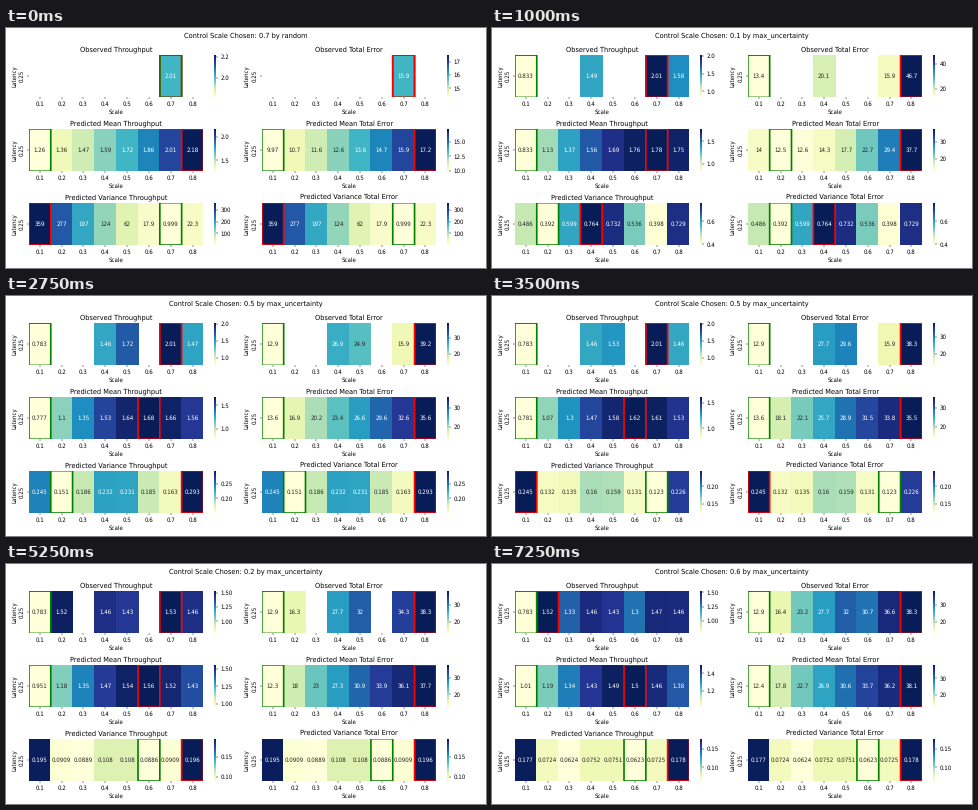
A matplotlib script for the animation above (7.5 s loop, 480 by 240 pixels).

```python
import numpy as np
import matplotlib.pyplot as plt
from matplotlib.animation import FuncAnimation
from matplotlib.patches import Rectangle

plt.rcParams.update({"font.family": "DejaVu Sans", "text.hinting": "none",
                     "path.snap": False})

STEPS, INTERVAL = 30, 250
SCALES = np.arange(1, 9) / 10
LATENCY = .25
PRIOR_VARIANCE = 1000
MAX_TRIES = 4
NA = np.nan

# Per scale: first reading, and the running average after MAX_TRIES readings.
THROUGHPUT = ([.934, 1.49, 1.33, 1.49, 1.72, 1.3, 2.014, 1.58],
              [.783, 1.52, 1.33, 1.46, 1.43, 1.3, 1.47, 1.46])
ERROR = ([14.3, 15.7, 23.2, 20.1, 24.9, 30.7, 15.915, 46.7],
         [12.9, 16.4, 23.2, 27.7, 32, 30.7, 36.6, 38.3])

# Quadratic features of (latency, scale), one row per scale.
ONE = np.ones_like(SCALES)
FEATURES = np.column_stack([ONE, LATENCY * ONE, SCALES, LATENCY ** 2 * ONE,
                            LATENCY * SCALES, SCALES ** 2])


def averages(readings, counts):
    """Running averages: all readings after the first are alike."""
    first, settled = map(np.array, readings)
    tries = np.maximum(counts, 1)
    share = (1 - 1 / tries) / (1 - 1 / MAX_TRIES)
    return np.where(counts > 0, first + (settled - first) * share, NA)


def simulate():
    """Bayesian quadratic fit that always tries the least certain scale."""
    counts = np.zeros(8, int)
    column, states = 6, []
    for _ in range(STEPS):
        counts[column] += 1
        precision = (np.eye(6) / PRIOR_VARIANCE
                     + FEATURES.T @ (counts[:, None] * FEATURES))
        cov = np.linalg.inv(precision)
        variance = np.sum(FEATURES @ cov * FEATURES, axis=1)
        seen = [averages(data, counts) for data in (THROUGHPUT, ERROR)]
        fits = [FEATURES @ cov @ FEATURES.T @ (counts * np.nan_to_num(avg))
                for avg in seen]
        states.append((column, [*seen, *fits, variance, variance]))
        column = np.argmax(np.where(counts < MAX_TRIES, variance, -1))
    return states


def luminance(rgb):
    rgb = np.asarray(rgb[:3])
    lin = np.where(rgb <= .03928, rgb / 12.92, ((rgb + .055) / 1.055) ** 2.4)
    return lin @ [.2126, .7152, .0722]


class Heatmap:
    def __init__(self, ax, title, edge_order):
        self.mesh = ax.pcolormesh(np.zeros((1, 8)), cmap="YlGnBu")
        ax.set(xlim=(0, 8), ylim=(1, 0), title=title,
               xlabel="Scale", ylabel="Latency")
        ax.set_xticks(np.arange(8) + .5, [f"{s:.1f}" for s in SCALES])
        ax.set_yticks([.5], [str(LATENCY)], rotation=90, va="center")
        ax.spines[:].set_visible(False)
        bar = ax.figure.colorbar(self.mesh, ax=ax)
        bar.outline.set_linewidth(0)
        self.notes = [ax.text(c + .5, .5, "", ha="center", va="center")
                      for c in range(8)]
        self.boxes = {}
        for color in edge_order:
            box = Rectangle((0, 0), 1, 1, fill=False, edgecolor=color, lw=3)
            self.boxes[color] = ax.add_patch(box)

    def show(self, row):
        low, high = np.nanmin(row), np.nanmax(row)
        if low == high:
            low, high = low * .9, high * 1.1
        self.mesh.set_array(np.ma.masked_invalid(row[None, :]))
        self.mesh.set_clim(low, high)
        for note, value in zip(self.notes, row):
            if np.isnan(value):
                note.set_text("")
                continue
            fill = self.mesh.cmap(self.mesh.norm(value))
            note.set_text(f"{value:.3g}")
            note.set_color(".15" if luminance(fill) > .408 else "w")
        self.boxes["green"].set_x(np.nanargmin(row))
        self.boxes["red"].set_x(np.nanargmax(row))


fig, axes = plt.subplots(3, 2, figsize=(12, 6), dpi=40)
heading = fig.suptitle("", y=.983)
maps = []
for axes_row, kind in zip(axes, ("Observed", "Predicted Mean",
                                 "Predicted Variance")):
    left, right = axes_row
    maps.append(Heatmap(left, f"{kind} Throughput", ("red", "green")))
    maps.append(Heatmap(right, f"{kind} Total Error", ("green", "red")))
states = simulate()


def update(step):
    column, rows = states[step]
    reason = "max_uncertainty" if step else "random"
    heading.set_text(f"Control Scale Chosen: {SCALES[column]:.1f} by {reason}")
    for heatmap, row in zip(maps, rows):
        heatmap.show(row)


# Text is measured at a finer resolution so that the layout is not rounded.
update(0)
fig.set_dpi(100)
fig.tight_layout()
fig.set_dpi(40)

anim = FuncAnimation(fig, update, frames=STEPS, interval=INTERVAL,
                     init_func=lambda: update(0), repeat=True, repeat_delay=0)
plt.show()
```
